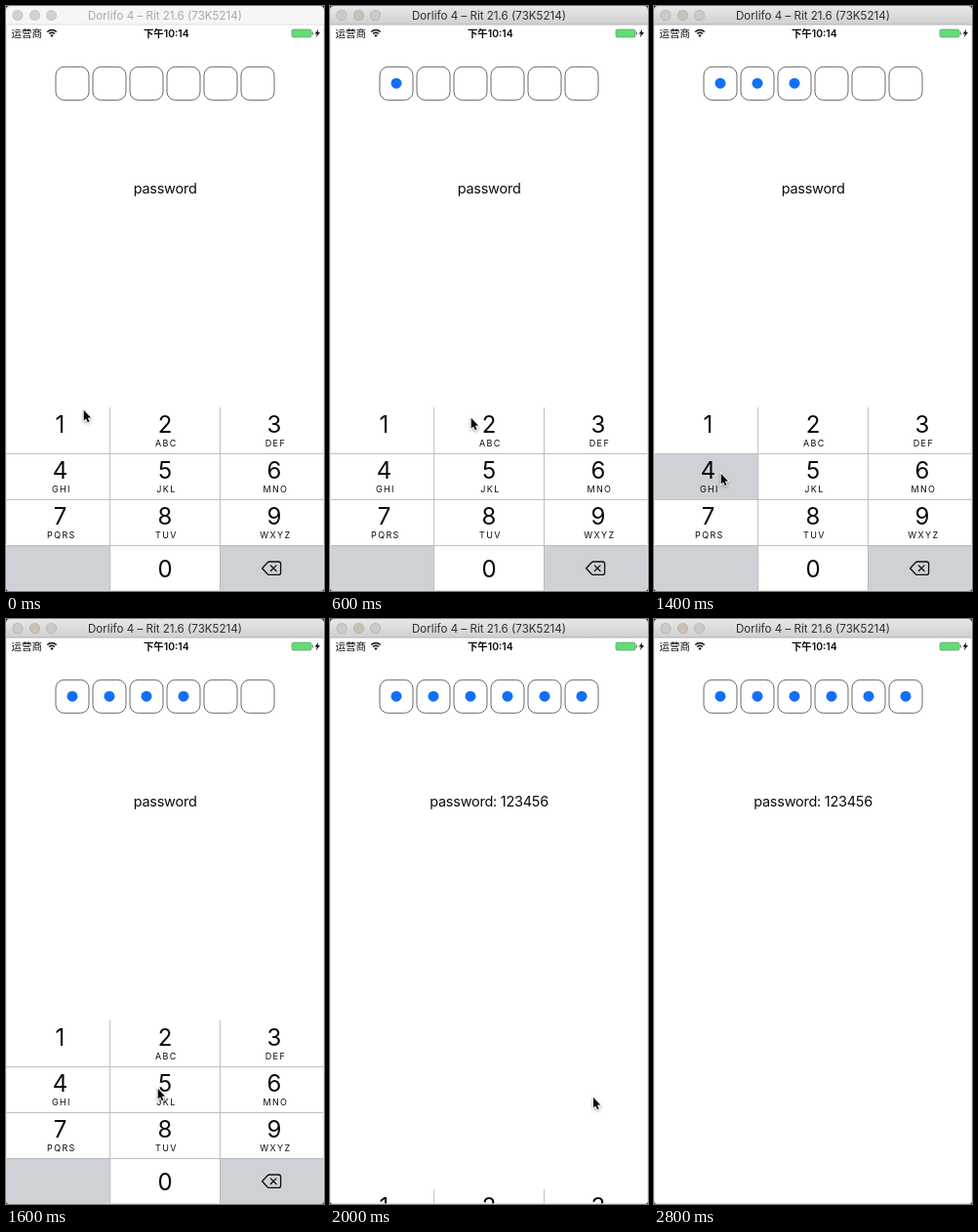
Animation of 326x599 px, one loop 2.9 s. Source, as an HTML page with a canvas:

```html
<!DOCTYPE html>
<html lang="zh">
<head>
<meta charset="utf-8">
<title>Passcode entry</title>
<style>
  html, body { margin: 0; width: 100%; height: 100%; overflow: hidden; background: #fff; }
  canvas { display: block; width: 326px; height: 599px; }
</style>
</head>
<body>
<canvas id="stage"></canvas>
<script>
const W = 326, H = 599, LOOP = 2900, STEP = 100;
const KEYS_TOP = 411, KEYS_H = 188, ROW_H = 47;
const SANS = 'Inter, "Noto Sans CJK SC", "Noto Sans CJK", sans-serif';
const KEY_GRAY = '#ced1d6', LINE_GRAY = '#b9babc';
const COLUMNS = [[0, 107, 55.5], [107, 219, 163], [219, 326, 275]];
const LETTERS = ['', 'ABC', 'DEF', 'GHI', 'JKL', 'MNO', 'PQRS', 'TUV', 'WXYZ'];
const ACTIVATE = 200, SLIDE_START = 1810;
const DOT_TIMES = [400, 800, 1000, 1500, 1700, 1900];
const PRESSES = { 300: 1, 700: 2, 1400: 4 };
// time, x, y of the pointer tip
const PATH = [
  [0, 79, 413], [200, 74, 421], [400, 76, 422], [600, 144, 421],
  [800, 164, 423], [1000, 231, 424], [1100, 232, 423], [1250, 135, 458],
  [1400, 68, 478], [1500, 88, 480], [1600, 155, 480], [1680, 182, 484],
  [1800, 260, 489], [1900, 269, 489], [2400, 270, 489], [2700, 277, 602], [2900, 277, 620]
];

const canvas = document.getElementById('stage');
const ctx = canvas.getContext('2d');
const ratio = window.devicePixelRatio || 1;
canvas.width = W * ratio;
canvas.height = H * ratio;

function rect(x, y, w, h, color) {
  ctx.fillStyle = color;
  ctx.fillRect(x, y, w, h);
}

function roundRect(x, y, w, h, r) {
  ctx.beginPath();
  ctx.roundRect(x, y, w, h, r);
}

function circle(x, y, r, color) {
  ctx.beginPath();
  ctx.arc(x, y, r, 0, Math.PI * 2);
  ctx.fillStyle = color;
  ctx.fill();
}

function polygon(points) {
  ctx.beginPath();
  for (const [x, y] of points) ctx.lineTo(x, y);
  ctx.closePath();
}

function text(value, x, y, size, { weight = 400, color = '#0a0a0a', spacing = 0, align = 'center' } = {}) {
  ctx.font = `${weight} ${size}px ${SANS}`;
  ctx.letterSpacing = `${spacing}px`;
  ctx.textAlign = align;
  ctx.fillStyle = color;
  ctx.fillText(value, x + (align === 'center' ? spacing / 2 : 0), y);
}

function drawTitleBar(active) {
  const fill = ctx.createLinearGradient(0, 0, 0, 19);
  fill.addColorStop(0, active ? '#e9e8e9' : '#f6f6f6');
  fill.addColorStop(1, active ? '#d0cfd0' : '#f6f6f6');
  rect(0, 0, W, 19, fill);
  rect(0, 18.5, W, 1, active ? '#b5b4b5' : '#dedede');
  [12, 29.5, 46.5].forEach((x, i) => {
    const color = active ? (i === 1 ? '#c8c0b4' : '#cbcacb') : '#d1d0d1';
    circle(x, 9.5, 5.5, active ? '#b4b2b1' : '#c8c7c8');
    circle(x, 9.5, 4.8, color);
  });
  text('Dorlifo 4 – Rit 21.6 (73K5214)', 163, 14, 11.6, { color: active ? '#2e2d2e' : '#a9a8a9' });
}

function drawWifi() {
  ctx.strokeStyle = '#111';
  ctx.lineWidth = 1.5;
  for (const r of [4, 6.7]) {
    ctx.beginPath();
    ctx.arc(47, 31.3, r, -Math.PI * 0.75, -Math.PI * 0.25);
    ctx.stroke();
  }
  ctx.beginPath();
  ctx.moveTo(47, 32);
  ctx.arc(47, 31.8, 2.4, -Math.PI * 0.75, -Math.PI * 0.25);
  ctx.fillStyle = '#111';
  ctx.fill();
}

function drawStatusBar() {
  text('运营商', 5.5, 32, 10.5, { align: 'left' });
  drawWifi();
  text('下午10:14', 164.3, 32, 10.4, { weight: 600 });
  roundRect(293, 24, 20, 8, 1.5);
  ctx.fillStyle = '#62dc76';
  ctx.fill();
  ctx.strokeStyle = '#66916d';
  ctx.lineWidth = 0.7;
  ctx.stroke();
  rect(313.7, 26.5, 1.2, 3, '#777');
  polygon([[320.2, 23.8], [316.6, 28.6], [318.8, 28.6], [317.8, 32.2], [322, 27.1], [319.6, 27.1]]);
  ctx.fillStyle = '#111';
  ctx.fill();
}

function drawFields(count) {
  for (let i = 0; i < 6; i++) {
    const x = 51 + i * 38;
    roundRect(x, 62.3, 34, 34, 8.5);
    ctx.strokeStyle = '#606060';
    ctx.lineWidth = 0.95;
    ctx.stroke();
    if (i < count) circle(x + 17, 79.2, 5.5, '#126ff7');
  }
}

function drawBackspace() {
  ctx.strokeStyle = '#111';
  ctx.lineWidth = 1.3;
  ctx.lineJoin = ctx.lineCap = 'round';
  ctx.beginPath();
  ctx.moveTo(262.6, 575.7);
  ctx.lineTo(268.2, 569.7);
  ctx.quadraticCurveTo(269, 569, 270, 569);
  ctx.arcTo(281.6, 569, 281.6, 575, 2.2);
  ctx.arcTo(281.6, 582.4, 275, 582.4, 2.2);
  ctx.lineTo(270, 582.4);
  ctx.quadraticCurveTo(269, 582.4, 268.2, 581.7);
  ctx.closePath();
  ctx.moveTo(271.3, 572.9);
  ctx.lineTo(277, 578.5);
  ctx.moveTo(277, 572.9);
  ctx.lineTo(271.3, 578.5);
  ctx.stroke();
}

function drawKeypad(offset, pressed) {
  ctx.save();
  ctx.translate(0, offset);
  rect(0, KEYS_TOP, W, KEYS_H, '#fff');
  for (let i = 0; i < 9; i++) {
    const [left, right, center] = COLUMNS[i % 3];
    const top = KEYS_TOP + Math.floor(i / 3) * ROW_H;
    if (pressed === i + 1) rect(left, top, right - left, ROW_H, KEY_GRAY);
    text(i + 1, center, top + 26.3, 24);
    text(LETTERS[i], center + 0.7, top + 39.6, 9, { spacing: 1.4 });
  }
  for (const [left, right] of [COLUMNS[0], COLUMNS[2]]) {
    rect(left, 552, right - left, ROW_H, KEY_GRAY);
  }
  text('0', 163, 584.5, 24);
  drawBackspace();
  for (const y of [458, 505, 552]) rect(0, y, W, 0.9, LINE_GRAY);
  for (const x of [106.2, 219]) rect(x, KEYS_TOP, 0.9, KEYS_H, LINE_GRAY);
  ctx.restore();
}

function drawPointer(t) {
  const next = Math.max(1, PATH.findIndex(point => point[0] >= t));
  const [t0, x0, y0] = PATH[next - 1], [t1, x1, y1] = PATH[next];
  const k = (t - t0) / (t1 - t0);
  ctx.save();
  ctx.translate(x0 + (x1 - x0) * k + 0.7, y0 + (y1 - y0) * k + 0.8);
  polygon([[0, 0], [0, 10.8], [2.4, 8.6], [4.1, 12.5], [5.8, 11.7], [4.1, 7.9], [7.3, 7.7]]);
  ctx.shadowColor = 'rgba(0,0,0,.35)';
  ctx.shadowBlur = 3 * ratio;
  ctx.shadowOffsetY = 1.2 * ratio;
  ctx.strokeStyle = '#fff';
  ctx.lineWidth = 1.6;
  ctx.lineJoin = 'miter';
  ctx.stroke();
  ctx.shadowColor = 'transparent';
  ctx.fillStyle = '#080808';
  ctx.fill();
  ctx.restore();
}

function drawWindowEdge() {
  rect(0, 20, 0.7, H, '#dcdcdc');
  rect(W - 0.7, 20, 0.7, H, '#dcdcdc');
  rect(0, H - 0.7, W, 0.7, '#d5d5d5');
  ctx.beginPath();
  ctx.rect(0, 0, W, H);
  ctx.roundRect(0, 0, W, H, [4, 4, 3, 3]);
  ctx.fillStyle = '#222';
  ctx.fill('evenodd');
}

// Critically damped spring, from 0 to 1
function spring(ms) {
  const x = Math.max(0, ms) * 0.022;
  return 1 - (1 + x) * Math.exp(-x);
}

function draw(t) {
  const count = DOT_TIMES.filter(time => time <= t).length;
  const slide = spring(t - SLIDE_START);
  ctx.setTransform(ratio, 0, 0, ratio, 0, 0);
  rect(0, 0, W, H, '#fff');
  drawTitleBar(t >= ACTIVATE);
  drawStatusBar();
  drawFields(count);
  text(count === 6 ? 'password: 123456' : 'password', 163.2, 192, 14.5, { spacing: -0.25 });
  if (slide < 0.995) drawKeypad(slide * KEYS_H, PRESSES[t]);
  drawPointer(t);
  drawWindowEdge();
}

const start = performance.now();
function tick() {
  const elapsed = (performance.now() - start) % LOOP;
  draw(Math.floor(elapsed / STEP) * STEP);
  requestAnimationFrame(tick);
}
tick();
</script>
</body>
</html>
```
